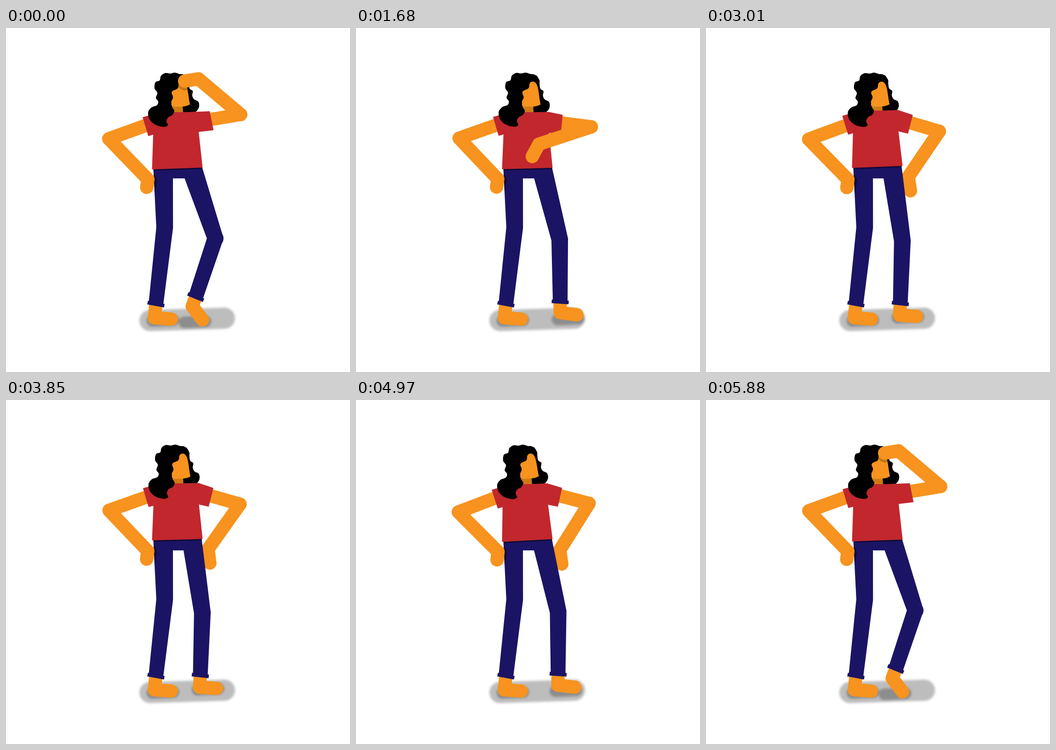
An HTML page with a canvas for the animation above (5.95 s loop, 748 by 748 pixels).

```html
<!DOCTYPE html>
<html lang="en">
<head>
<meta charset="utf-8">
<title>Lookout</title>
<style>
  html, body { margin: 0; width: 100%; height: 100%; overflow: hidden; background: #fff; }
  canvas { display: block; }
</style>
</head>
<body>
<canvas id="stage" width="748" height="748"></canvas>
<script>
const ctx = document.getElementById('stage').getContext('2d');
const LOOP = 5950, STEP = 70, RAD = Math.PI / 180;
const SKIN = '#f7931e', NECK = '#cf7a17', SHIRT = '#c1272d', NAVY = '#1b1464';
const PIVOT = [372, 306];

// knee, ankle, heel, foot angle, contact shadow
const TIPTOE = [455, 457.5, 412.5, 585, 405, 605, 53, 411, 639];
const PUSH = [456, 458, 414, 585, 407, 605, 53, 423, 638.5];
const STRIDE = [459, 457, 465.5, 592, 466.5, 613, 11.5, 483, 637];
const STAND = [427, 463, 422.5, 599, 421, 624.5, 4, 439, 629];
const LEFT_LEG = [345, 434, 326, 600.5, 322.5, 630, 4.5, 341, 636];
const LEG = [[0, TIPTOE], [1050, TIPTOE], [1120, PUSH], [1330, STRIDE], [2030, STAND],
  [4760, STAND], [5250, STRIDE], [5880, TIPTOE]];

// angles of upper arm, forearm and hand
const LOOK = [-9.5, 220.2, 171], PEER = [-7.7, 224, 180], HIP = [16.3, 124.2, 81], REST = [15.6, 126.6, 84];
const ARM = [[0, LOOK], [280, LOOK], [770, PEER], [1050, PEER], [2130, HIP], [3500, HIP],
  [4200, REST], [4700, REST], [5250, [13.4, 117.4, 79]], [5880, LOOK]];

// tilt of the upper body, lift of the shirt
const BODY = [[0, [0, 0]], [1050, [0, 0]], [1330, [-1.9, 0]], [1830, [1.2, 0]], [2310, [1.15, 0]],
  [2950, [-.35, -3.5]], [3500, [-.35, -3.5]], [4200, [1.15, 0]], [4380, [1.15, 0]],
  [5250, [-1.7, 0]], [5880, [0, 0]]];

function pose(keys, t) {
  const i = keys.findIndex(k => k[0] > t);
  if (i < 0) return keys[keys.length - 1][1];
  const [t0, a] = keys[i - 1], [t1, b] = keys[i];
  const p = (t - t0) / (t1 - t0), e = p * p * (3 - 2 * p);
  return a.map((v, n) => v + (b[n] - v) * e);
}

const polar = ([x, y], deg, r) => [x + r * Math.cos(deg * RAD), y + r * Math.sin(deg * RAD)];
const angle = (a, b) => Math.atan2(b[1] - a[1], b[0] - a[0]) / RAD;

function polygon(pts, path = new Path2D()) {
  pts.forEach((p, i) => i ? path.lineTo(...p) : path.moveTo(...p));
  path.closePath();
  return path;
}

// closed curve passing through every point
function blob(flat) {
  const pts = [];
  for (let i = 0; i < flat.length; i += 2) pts.push([flat[i], flat[i + 1]]);
  const at = i => pts[(i + pts.length) % pts.length], path = new Path2D();
  path.moveTo(...pts[0]);
  pts.forEach((p, i) => {
    const o = at(i - 1), q = at(i + 1), r = at(i + 2);
    path.bezierCurveTo(p[0] + (q[0] - o[0]) / 6, p[1] + (q[1] - o[1]) / 6,
      q[0] - (r[0] - p[0]) / 6, q[1] - (r[1] - p[1]) / 6, ...q);
  });
  return path;
}

function fill(path, color) {
  ctx.fillStyle = color;
  ctx.fill(path);
}

function limb(pts, color = SKIN, width = 29) {
  ctx.strokeStyle = color;
  ctx.lineWidth = width;
  ctx.lineCap = ctx.lineJoin = 'round';
  ctx.beginPath();
  pts.forEach(p => ctx.lineTo(...p));
  ctx.stroke();
}

function inside(path, draw) {
  ctx.save();
  ctx.clip(path);
  draw();
  ctx.restore();
}

function tilted(deg, draw) {
  ctx.save();
  ctx.translate(...PIVOT);
  ctx.rotate(deg * RAD);
  ctx.translate(-PIVOT[0], -PIVOT[1]);
  draw();
  ctx.restore();
}

const HAIR = blob([386, 101, 377, 100, 367, 97, 357, 99, 346, 98, 337, 104, 334, 114, 325, 118,
  323, 131, 329, 141, 326, 152, 331, 160, 328, 168, 316, 173, 309, 184, 313, 200, 326, 211,
  344, 215, 352, 211, 349, 203, 353, 194, 362, 189, 366, 180, 361, 171, 362, 160, 380, 130, 397, 119, 394, 108]);
const BACK_HAIR = blob([388, 103, 396, 112, 399, 131, 406, 137, 405, 147, 409, 155, 418, 160,
  420, 170, 415, 180, 400, 190, 384, 188, 384, 165, 380, 125]);
const FACE = new Path2D('M383 116.5C376 117 375 122 375 127C374 135 366 133 361 138' +
  'C358 143 364 146 363 152C362 156 358 159 360 165L364 171C378 172 392 171 400 166' +
  'C397 152 396 136 393 127Q390 117 383 116.5Z');
const NECK_SHAPE = polygon([[360, 168], [384, 168], [385.5, 190], [360, 190]]);

function addLeg(path, p, hip, crotch, side) {
  const knee = [p[0], p[1]], ankle = [p[2], p[3]];
  const thigh = angle([(hip[0] + crotch[0]) / 2, 318], knee), shin = angle(knee, ankle);
  const bend = (thigh + shin) / 2 - 90 * side, end = shin - 90 * side;
  const pts = [hip, polar(knee, bend, 18.2), polar(ankle, end, 16),
    polar(ankle, end, -16), polar(knee, bend, -18.2), crotch];
  polygon(side < 0 ? pts.reverse() : pts, path);
  path.moveTo(knee[0] + 18, knee[1]);
  path.arc(...knee, 18, 0, 2 * Math.PI);
  const tilt = shin - 86, a = polar(ankle, tilt, -18.5), b = polar(ankle, tilt, 18.5);
  polygon([polar(a, tilt - 90, 4), polar(b, tilt - 90, 4), polar(b, tilt + 90, 4), polar(a, tilt + 90, 4)], path);
}

function foot(p) {
  const heel = [p[4], p[5]];
  limb([[p[2], p[3]], heel, polar(heel, p[6], 37)]);
}

function shadows(leg) {
  ctx.save();
  ctx.filter = 'blur(2.5px)';
  limb([[313, 636], [475, 631]], 'rgba(0,0,0,.26)', 46);
  for (const p of [LEFT_LEG, leg])
    limb([[p[7] - 23, p[8] + 1], [p[7] + 23, p[8] - 1]], 'rgba(0,0,0,.26)', 25);
  ctx.restore();
}

function draw(t) {
  const leg = pose(LEG, t), [upper, fore, palm] = pose(ARM, t), [tilt, lift] = pose(BODY, t);
  ctx.clearRect(0, 0, 748, 748);
  shadows(leg);
  foot(LEFT_LEG);
  foot(leg);

  // shoulder in the tilted body, then in stage space
  const joint = [421, 203 + lift];
  const reach = Math.hypot(joint[0] - PIVOT[0], joint[1] - PIVOT[1]);
  const shoulder = polar(PIVOT, angle(PIVOT, joint) + tilt, reach);
  const elbow = polar(shoulder, upper, 90.5), wrist = polar(elbow, fore, 120), hand = polar(wrist, palm, 30.5);
  const front = fore > 135;
  limb([shoulder, elbow]);
  if (!front) limb([elbow, wrist, hand]);

  const crotch = [386 + (leg[0] - 427) / 12, 327];
  const pants = polygon([[320, 298], [425, 298], crotch, [363, 327]]);
  addLeg(pants, LEFT_LEG, [320, 298], [363, 327], -1);
  addLeg(pants, leg, [425, 298], crotch, 1);
  fill(pants, NAVY);

  const cuff = polar(polar(joint, upper - tilt, 26), upper - tilt + 90, 3);
  const across = upper - tilt + 88;
  const shirt = polygon([[336, 183 + lift], [297, 194 + lift], [309.5, 235 + lift], [320, 232 + lift],
    [317.5, 307.5 + lift], [427.5, 303.5 + lift], [419, 227 + lift + upper / 10],
    polar(cuff, across, 21), polar(cuff, across, -21), [418, 182 + lift], [384, 183 + lift]]);
  const leftHand = [[308.5, 329], [306, 346.5]];
  inside(pants, () => tilted(tilt, () => {
    limb(leftHand.map(([x, y]) => [x + 5, y + 2]), 'rgba(0,0,0,.45)');
    ctx.translate(0, 3);
    fill(shirt, 'rgba(0,0,0,.45)');
  }));

  tilted(tilt, () => {
    limb([[320, 206], [223.5, 241], ...leftHand]);
    fill(BACK_HAIR, '#000');
    fill(NECK_SHAPE, NECK);
    fill(shirt, SHIRT);
    fill(HAIR, '#000');
    fill(FACE, SKIN);
    if (front) inside(FACE, () => tilted(-tilt, () =>
      limb([wrist, hand].map(([x, y]) => [x, y + 6]), 'rgba(0,0,0,.2)')));
  });
  if (front) limb([elbow, wrist, hand]);
}

const start = performance.now();
function tick() {
  const t = (performance.now() - start) % LOOP;
  draw(Math.floor(t / STEP) * STEP);
  requestAnimationFrame(tick);
}
tick();
</script>
</body>
</html>
```
